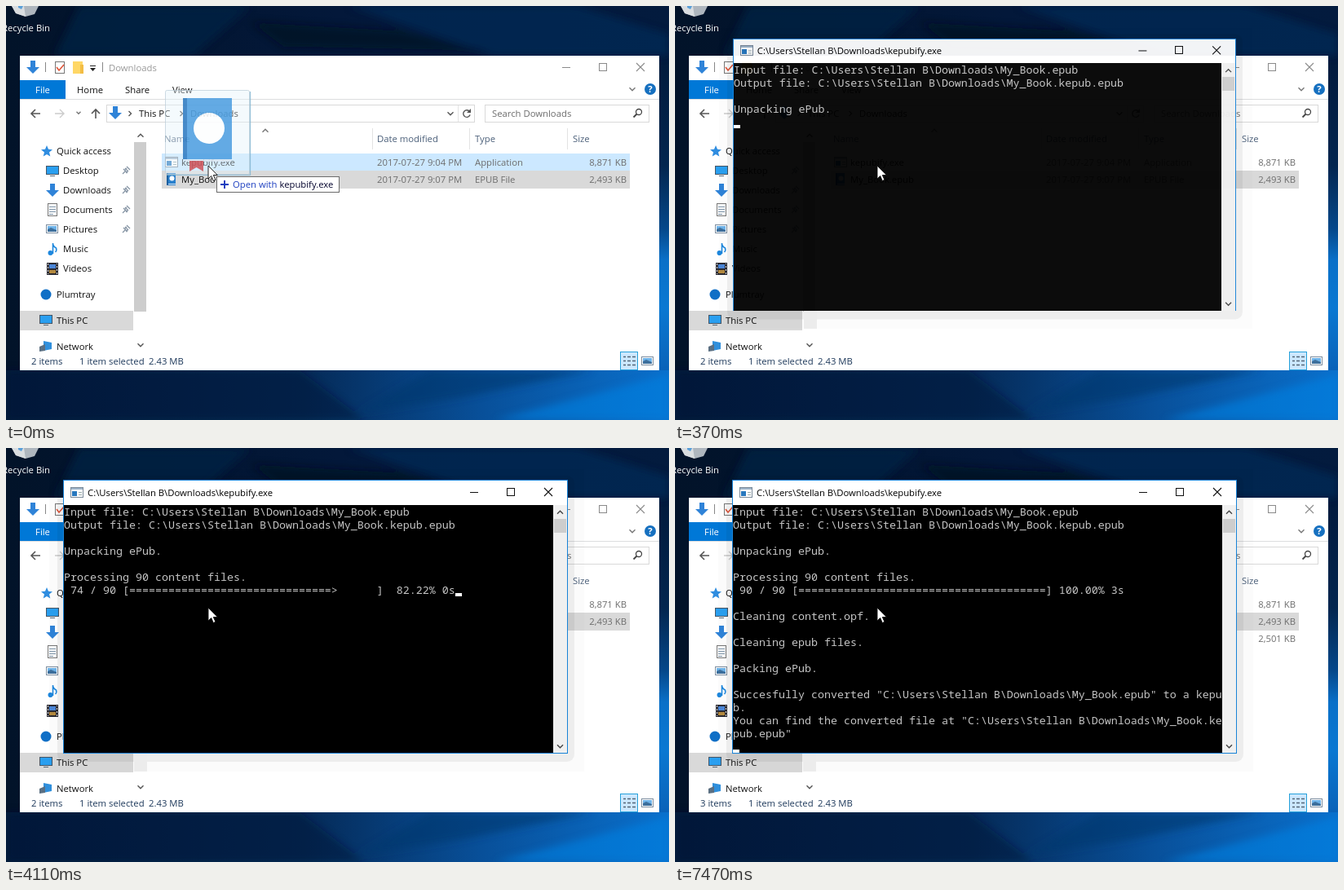
An HTML page for the animation above (8 s loop, 813 by 508 pixels).

```html
<!DOCTYPE html>
<html lang="en">
<head>
<meta charset="utf-8">
<title>Converting a book</title>
<style>
  html, body { margin: 0; width: 100%; height: 100%; overflow: hidden; background: #03142e; }
  svg { display: block; width: 813px; height: 508px; }
  text { font-family: "Open Sans", "Noto Sans", sans-serif; font-size: 11.3px; white-space: pre; }
  .mono { font-family: "Noto Sans Mono", "DejaVu Sans Mono", monospace; font-size: 13.333px; fill: #c4c4c4; }
  rect { shape-rendering: crispEdges; }
  .soft { shape-rendering: auto; }
</style>
</head>
<body>
<svg id="stage" viewBox="0 0 813 508"></svg>
<script>
const LOOP = 8000;
const HOME = String.raw`C:\Users\Stellan B\Downloads` + '\\';
const COLS = 75, CELL = 8, ROW = 16, LEFT = 71, TOP = 70;

// drawing helpers, each returns markup
const rect = (x, y, w, h, fill, extra = '') =>
  `<rect x="${x}" y="${y}" width="${w}" height="${h}" fill="${fill}" ${extra}/>`;
const box = (x, y, w, h, fill, stroke) =>
  rect(x + .5, y + .5, w - 1, h - 1, fill, `stroke="${stroke}"`);
const text = (x, mid, s, fill = '#111', extra = '') =>
  `<text x="${x}" y="${mid + 4}" fill="${fill}" ${extra}>${s}</text>`;
const line = (d, stroke = '#555', w = 1, extra = '') =>
  `<path d="${d}" fill="none" stroke="${stroke}" stroke-width="${w}" ${extra}/>`;
const shape = (d, fill, extra = '') => `<path d="${d}" fill="${fill}" ${extra}/>`;
const dot = (x, y, r, fill) => `<circle cx="${x}" cy="${y}" r="${r}" fill="${fill}"/>`;
const group = (id, ...parts) => `<g id="${id}">${parts.join('')}</g>`;
const gradient = (id, dir, ...stops) => `<linearGradient id="${id}" ${dir}>` +
  stops.map(([at, c]) => `<stop offset="${at}" stop-color="${c}"/>`).join('') + '</linearGradient>';

const chevron = (x, y, dir, stroke = '#555', s = 3.5) => {
  const turn = { down: 0, left: 90, up: 180, right: 270 }[dir];
  return line(`M${-s} ${-s / 2}L0 ${s / 2}L${s} ${-s / 2}`, stroke, 1.4,
    `transform="translate(${x} ${y}) rotate(${turn})"`);
};
const downArrow = (x, y) =>
  shape(`M${x - 3} ${y - 8}h6v8h5l-8 8l-8 -8h5z`, '#2f83d8');
const pin = y =>
  line(`M143 ${y + 4}l4 -4m-3 -2l5 5m-3 -6l4 4m-2 -6l4 4m-4 -2l-2 2m3 2l-2 2`, '#8493a3', 1.2);
const controls = (x, y, stroke) =>
  line(`M${x} ${y + .5}h10`, stroke) + box(x + 45, y - 5, 10, 10, 'none', stroke) +
  line(`M${x + 91} ${y - 5}l10 10m0 -10l-10 10`, stroke, 1.1);
const appIcon = (x, y) =>
  box(x, y, 16, 13, '#fff', '#7b8a99') + rect(x + 1, y + 1, 14, 2, '#9fb4c8') +
  rect(x + 2, y + 5, 6, 6, '#2878be') + line(`M${x + 10} ${y + 6.5}h4m-4 3h4`, '#9aa');
const picture = (x, y) =>
  box(x, y, 15, 11, '#fff', '#7d8ea0') + rect(x + 2, y + 2, 11, 7, '#6fb4ea') +
  shape(`M${x + 2} ${y + 9}v-3l4 -2l7 3v2z`, '#3d6f9c');
const monitor = (x, y) =>
  box(x, y, 16, 11, '#2a9ff0', '#456') + rect(x + 5, y + 12, 6, 1, '#567');

function desktop() {
  return '<defs><filter id="blur"><feGaussianBlur stdDeviation="5"/></filter>' +
  gradient('sky', '', [0, '#021329'], [.5, '#03183a'], [1, '#031b3e']) +
  gradient('floor', '', [0, '#03183a'], [.45, '#052a57'], [.72, '#08509a'], [1, '#0a70cc']) +
  gradient('edge', 'x2="0" y2="1"', [0, '#021a3c'], [.35, '#03264f'], [.55, '#05488a'],
    [.65, '#0a70c8'], [.8, '#0a78d2'], [1, '#0a62b8']) + '</defs>' +
  rect(0, 0, 813, 508, 'url(#sky)') +
  rect(801, 61, 12, 386, 'url(#edge)') +
  rect(0, 447, 813, 61, 'url(#floor)') +
  '<g filter="url(#blur)">' +
  shape('M90 0H300L230 61H60Z', '#042448', 'opacity=".7"') +
  shape('M420 0H700L813 35V61H600Z', '#05305f', 'opacity=".55"') +
  shape('M300 20L480 30L590 55L340 50Z', '#010d20', 'opacity=".6"') +
  shape('M0 447H360L440 508H0Z', '#02173a', 'opacity=".5"') +
  shape('M600 508L813 452V508Z', '#0a80e2', 'opacity=".6"') +
  shape('M520 447H720L560 480L430 500Z', '#05386f', 'opacity=".6"') + '</g>' +
  shape('M7 0H40L35 10L24 13L12 9Z', '#aeb6be') +
  shape('M7 0H22L24 13L12 9Z', '#d9dde0') +
  shape('M15 0h6l-2 4l-4 -2z', '#5a9fd8') +
  text(54, 27, 'Recycle Bin', '#fff', 'text-anchor="end"');
}

function sidebar() {
  const items = [['Desktop', 202], ['Downloads', 226], ['Documents', 250],
    ['Pictures', 274], ['Music', 298], ['Videos', 322]];
  return rect(157, 167, 15, 208, '#cdcdcd') +
    chevron(165, 159, 'up') + chevron(165, 416, 'down') +
    rect(17, 374, 139, 24, '#d9d9d9') +
    shape('M50 171l2 4.8l5 .4l-4 3.4l1.3 5l-4.3 -2.7l-4.3 2.7l1.3 -5l-4 -3.4l5 -.4z', '#2f8de0') +
    text(62, 178, 'Quick access') +
    items.map(([s, y], i) => text(70, y, s) + (i < 4 ? pin(y) : '')).join('') +
    monitor(49, 196) + downArrow(57, 226) +
    box(51, 242, 12, 16, '#fff', '#777') + line('M53 246.5h8m-8 3h8m-8 3h8m-8 3h5', '#7c93a8') +
    picture(49, 268) +
    line('M57.500 304V291q0 4 4 6q1 3 -1 5', '#1d87dd', 1.6) + dot(54.5, 303, 3, '#1d87dd') +
    rect(50, 315, 14, 15, '#2b2b33') + rect(53, 317, 8, 5, '#4a86d8') + rect(53, 324, 8, 4, '#b58a3e') +
    line('M51.500 316v13m11 0v-13', '#ddd', 1, 'stroke-dasharray="2 2"') +
    dot(49, 354, 6.5, '#0f6fc6') + text(62, 354, 'Plumtray') +
    monitor(41, 379) + text(62, 386, 'This PC') +
    shape('M46 411l10 2v8l-10 2z', '#2f8fdc') + shape('M41 418l7 -3v8l-7 1z', '#5a6f82') +
    text(62, 418, 'Network');
}

function fileRow(mid, name, date, type, size) {
  const grey = '#6d6d6d';
  return text(215, mid, name) + text(455, mid, date, grey) + text(575, mid, type, grey) +
    text(761, mid, size, grey, 'text-anchor="end"');
}
const bookIcon = y =>
  rect(197, y, 11, 15, '#2b80cc') + rect(197, y, 2, 15, '#1a5f9f') +
  dot(203.5, y + 6.5, 3, '#fff') + rect(199, y + 13, 9, 1, '#dfeaf4');

function explorer() {
  const head = '#4c607a', rule = '#e3e3e3';
  return rect(17, 61, 784, 386, '#fff') +
    downArrow(33, 75) + line('M48.500 69v12M118.500 69v12', '#888') +
    box(60, 68, 12, 15, '#fff', '#777') + line('M62 75l3 4l6 -7', '#e0563b', 1.6) +
    rect(82, 68, 12, 15, '#ffd766') + rect(91, 72, 4, 11, '#f3bd45') +
    line('M103 73.500h7', '#222') + shape('M103 76h7l-3.500 4z', '#222') +
    text(126, 76, 'Downloads', '#999') + controls(682, 75, '#8a8a8a') +
    rect(17, 91, 56, 23, '#0078d7') + text(45, 103, 'File', '#fff', 'text-anchor="middle"') +
    text(87, 103, 'Home') + text(146, 103, 'Share') + text(204, 103, 'View') +
    rect(17, 114, 784, 1, '#dcdddf') + chevron(768, 102, 'down', '#777') +
    dot(790, 102, 7, '#1670c0') + text(790, 102, '?', '#fff', 'text-anchor="middle" font-weight="700"') +
    line('M42 132H31m5 -5l-5 5l5 5', '#555', 1.6) +
    line('M60 132h11m-5 -5l5 5l-5 5', '#ccc', 1.4) + chevron(89, 131, 'down', '#777', 2.5) +
    line('M110 138V127m-5 5l5 -5l5 5', '#555', 1.6) +
    box(123, 121, 452, 22, '#fff', '#d9d9d9') + box(587, 121, 202, 22, '#fff', '#d9d9d9') +
    downArrow(134, 131) + chevron(152, 132, 'right', '#555', 3) + text(163, 132, 'This PC') +
    chevron(215, 132, 'right', '#555', 3) + text(226, 132, 'Downloads') +
    chevron(545, 132, 'down') + rect(554, 122, 1, 20, rule) +
    line('M568.500 129.500a4.300 4.300 0 1 0 .6 4', '#555', 1.4) + shape('M570 126v5h-5z', '#555') +
    text(596, 132, 'Search Downloads', '#6d6d6d') +
    `<circle cx="776" cy="130" r="3.500" fill="none" stroke="#444" stroke-width="1.300"/>` +
    line('M773.500 132.500l-4 4', '#444', 1.8) +
    text(194, 163, 'Name', head) + text(455, 163, 'Date modified', head) +
    text(575, 163, 'Type', head) + text(695, 163, 'Size', head) +
    [449, 568, 688].map(x => rect(x, 150, 1, 26, rule)).join('') + chevron(318, 153, 'up', '#777') +
    sidebar() +
    group('hover', rect(191, 181, 574, 21, '#cce8ff')) +
    rect(191, 202, 574, 22, '#d9d9d9') +
    appIcon(195, 185) + fileRow(192, 'kepubify.exe', '2017-07-27 9:04 PM', 'Application', '8,871 KB') +
    bookIcon(205) + fileRow(213, 'My_Book.epub', '2017-07-27 9:07 PM', 'EPUB File', '2,493 KB') +
    group('added', bookIcon(226),
      fileRow(234, 'My_Book.kepub.epub', '2017-07-27 9:08 PM', 'EPUB File', '2,501 KB')) +
    text(31, 436, '2 items', '#1e395b', 'id="count"') +
    text(90, 436, '1 item selected', '#1e395b') + text(175, 436, '2.43 MB', '#1e395b') +
    box(753, 424, 22, 23, '#cce8ff', '#26a0da') +
    line('M757 430.500h3m2 0h4m2 0h4m-15 5h3m2 0h4m2 0h4m-15 5h3m2 0h4m2 0h4', '#567', 1.6) +
    picture(779, 430);
}

function dragged() {
  return group('drag',
    rect(195.5, 103.5, 103, 103, '#e3f2fb',
      'class="soft" rx="2" fill-opacity=".4" stroke="#b9ccd8" stroke-opacity=".7"'),
    line('M197 207.500H299.500V105', '#7fb3d0', 1.2, 'opacity=".8"'),
    `<g opacity=".85">`,
    rect(217, 113, 60, 75, '#4a9de0'), rect(217, 113, 5, 75, '#2a78c0'),
    rect(220, 188, 56, 3, '#dbe8f3'), dot(249, 150, 19, '#fff'),
    shape('M225 190h17v13l-8.500 -5l-8.500 5z', '#cf5258'), `</g>`,
    box(258, 209, 151, 20, '#fff', '#6b6b6b'),
    line('M263 219h10m-5 -5v10', '#1d3fc0', 2),
    text(278, 219, 'Open with <tspan fill="#05052e">kepubify.exe</tspan>', '#1d3fc0'));
}

function terminal() {
  const rows = Array.from({ length: 19 }, (_, i) =>
    `<text class="mono row" x="${LEFT}" y="${TOP + ROW * i + 13}"></text>`).join('');
  return group('term',
    rect(53, 26, 656, 371, '#000', 'opacity=".015"'),
    rect(63, 34, 634, 351, '#000', 'class="soft" rx="9" opacity=".055"'),
    rect(157, 375, 16, 22, '#ececec'),
    box(70, 39, 619, 336, '#fff', '#1883d7'),
    appIcon(79, 48), text(100, 55, HOME + 'kepubify.exe', '#000'), controls(569, 54, '#111'),
    rect(71, 70, 600, 304, '#000'), rect(671, 70, 17, 304, '#f0f0f0'),
    rect(672, 87, 15, 17, '#cdcdcd'),
    chevron(679.5, 79, 'up', '#444'), chevron(679.5, 366, 'down', '#444'),
    rows, rect(0, 0, CELL, 4, '#fff', 'id="caret"'));
}

const stage = document.getElementById('stage');
stage.innerHTML = desktop() + explorer() + terminal() + dragged() +
  shape('M248 196v16l3.700 -3.500l2.600 6l2.600 -1.200l-2.600 -5.800h5z', '#fff',
    'stroke="#111" stroke-width=".9"');

const el = id => document.getElementById(id);
const rowEls = [...stage.querySelectorAll('.row')];
const show = (id, on) => el(id).setAttribute('visibility', on ? 'visible' : 'hidden');

// [start ms, scale, opacity] of the opening window
const OPENING = [[0, .94, 0], [120, .95, .2], [240, .981, .61], [370, .997, .95], [510, 1, 1]];
// [start ms, files done, time shown]
const PROGRESS = [[1070, 0, ''], [1350, 8, '3s'], [1650, 9, '3s'], [1930, 17, '2s'], [2230, 26, '2s'],
  [2370, 31, '2s'], [2500, 35, '2s'], [2800, 42, '1s'], [3230, 51, '1s'], [3530, 59, '1s'],
  [3830, 66, '0s'], [4110, 74, '0s'], [4420, 82, '0s'], [4570, 90, '3s']];
const CARET = [[0, true], [5980, false], [6420, true], [7010, false], [7470, true]];

const at = (steps, t) => steps.findLast(s => s[0] <= t);

function progressBar(done, time) {
  const total = 90, head = ` ${done} / ${total} [`;
  const tail = `] ${(done / total * 100).toFixed(2).padStart(6)}% ${time}`;
  const size = 60 - head.length - tail.length;
  const full = Math.ceil(done / total * size);
  const bar = full && full < size ? '='.repeat(full - 1) + '>' : '='.repeat(full);
  return head + bar.padEnd(size) + tail;
}

function wrap(s) {
  const out = [];
  for (let i = 0; i < s.length; i += COLS) out.push(s.slice(i, i + COLS));
  return out;
}

function screen(t) {
  const out = [`Input file: ${HOME}My_Book.epub`, `Output file: ${HOME}My_Book.kepub.epub`,
    '', 'Unpacking ePub.', ''];
  const step = at(PROGRESS, t);
  if (step) out.push('Processing 90 content files.', progressBar(step[1], step[2]));
  if (t >= 4570) out.push('', 'Cleaning content.opf.', '', 'Cleaning epub files.', '', 'Packing ePub.', '');
  if (t >= 4870) out.push(
    ...wrap(`Succesfully converted "${HOME}My_Book.epub" to a kepub.`),
    ...wrap(`You can find the converted file at "${HOME}My_Book.kepub.epub"`));
  if (t >= 4570) out.push('');
  return out;
}

function render(t) {
  const [, scale, opacity] = at(OPENING, t);
  el('term').setAttribute('transform',
    `translate(379.500 207.500) scale(${scale}) translate(-379.500 -207.500)`);
  el('term').setAttribute('opacity', opacity);
  show('drag', t < 120);
  show('hover', t < 120);
  show('added', t >= 5580);
  el('count').textContent = (t < 5580 ? 2 : 3) + ' items';

  const out = screen(t), last = out.length - 1;
  rowEls.forEach((row, i) => {
    const s = out[i] || '';
    if (row.textContent !== s) row.textContent = s;
  });
  el('caret').setAttribute('x', LEFT + CELL * out[last].length);
  el('caret').setAttribute('y', TOP + ROW * (last + 1) - 4);
  show('caret', at(CARET, t)[1]);
}

const start = performance.now();
function tick() {
  render((performance.now() - start) % LOOP);
  requestAnimationFrame(tick);
}
tick();
</script>
</body>
</html>
```
